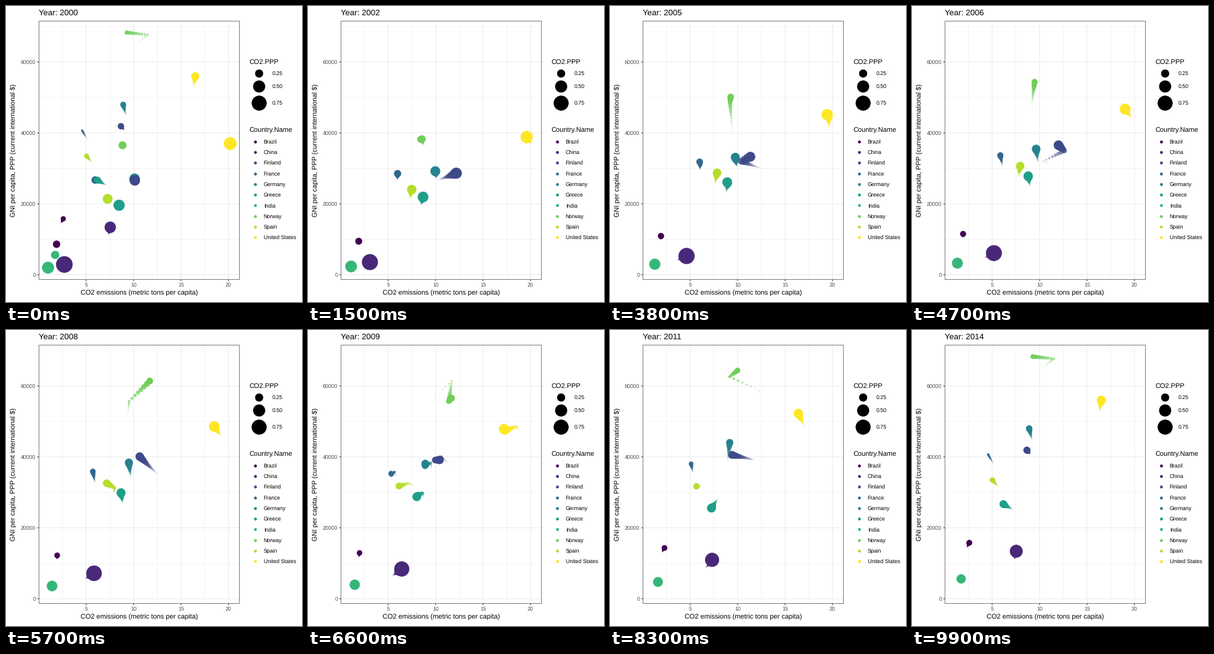
A matplotlib script for the animation above (10000 ms loop, 480 by 480 pixels).

```python
import numpy as np
import matplotlib as mpl
import matplotlib.pyplot as plt
from matplotlib.animation import FuncAnimation
from matplotlib.patches import Rectangle

SIZE, DPI = 480, 72          # one point equals one pixel
FRAMES, INTERVAL = 100, 100
FIRST_YEAR, SPAN = 2000, 14
WAKE = 15

mpl.rcParams["font.family"] = "Liberation Sans"
mpl.rcParams["text.hinting"] = "none"

years = np.arange(SPAN + 1)
tracks = {}


def country(name, *turns):
    """Yearly path through turning points (year, CO2 per head, income in $1000).

    Emissions run straight and income grows at a steady rate between turns.
    A turn in year 8 is followed by the recession of year 9 unless one is given.
    """
    turns = {t: (c, g) for t, c, g in turns}
    if 8 in turns:
        c, g = turns[8]
        turns.setdefault(9, (0.935 * c, 0.975 * g))
    t = sorted(turns)
    c, g = zip(*(turns[k] for k in t))
    tracks[name] = np.interp(years, t, c), np.exp(np.interp(years, t, np.log(g)))


country("Brazil", (0, 1.88, 8.6), (9, 1.95, 12.8), (14, 2.59, 15.8))
country("China", (0, 2.7, 2.9), (2, 3.01, 3.5), (11, 7.24, 10.3), (14, 7.54, 13.4))
country("United States", (0, 20.18, 37), (2, 19.6, 38.6), (5, 19.6, 44.6),
        (8, 18.5, 48.6), (12, 16.3, 52.8), (14, 16.5, 56))
country("Germany", (0, 10.1, 27.1), (5, 9.8, 32.3), (8, 9.5, 38.4),
        (12, 9.2, 44.8), (14, 8.9, 48))
country("India", (0, 0.98, 2), (14, 1.73, 5.6))
country("France", (0, 5.95, 26.7), (5, 6.05, 31.2), (8, 5.7, 35.9),
        (12, 5.07, 38.4), (14, 4.57, 40.7))
country("Spain", (0, 7.26, 21.4), (7, 8, 31.3), (8, 7.16, 32.6),
        (9, 6.2, 31.8), (12, 5.6, 31.7), (14, 5.03, 33.5))
country("Greece", (0, 8.47, 19.6), (5, 8.95, 25.5), (8, 8.67, 29.9),
        (12, 7.15, 25.2), (14, 6.18, 26.7))
country("Finland", (0, 10.13, 26.6), (3, 13, 29.5), (5, 10.4, 32), (6, 12.6, 35),
        (8, 10.64, 40.1), (10, 11.6, 39.3), (12, 9.03, 40.8), (14, 8.66, 41.9))
country("Norway", (0, 8.83, 36.5), (2, 8.4, 38.2), (3, 9.5, 38.7), (5, 9.2, 48.7),
        (7, 9.53, 55.7), (8, 11.7, 61.4), (9, 11.4, 55.7), (10, 12.3, 58.8),
        (11, 9.15, 62.6), (13, 11.5, 67.7), (14, 9.28, 68.3))

names = list(tracks)
co2, gni = np.array(list(tracks.values())).swapaxes(0, 1)
ratio = co2 / gni


def point_size(r):
    """Area scale running from size 1 to size 12."""
    lo, hi = ratio.min(), ratio.max()
    return 1 + 11 * np.sqrt((r - lo) / (hi - lo))


def marker_area(size):
    return (0.75 * (size * 2.845 + 0.945)) ** 2


def px(x):
    return 130 + 15.385 * (x - 5)


def py(y):
    return 435.8 - 5.75 * y


# Linear motion from year to year
keys = np.round(years * (FRAMES - 1) / SPAN)
steps = np.arange(FRAMES)


def tween(rows):
    return np.array([np.interp(steps, keys, row) for row in rows]).T


xs, ys, sizes = tween(px(co2)), tween(py(gni)), tween(point_size(ratio))

ordered = sorted(names)
palette = plt.get_cmap("viridis")(np.linspace(0, 1, len(names)))
colors = palette[[ordered.index(n) for n in names]]

fig = plt.figure(figsize=(SIZE / DPI, SIZE / DPI), dpi=DPI, facecolor="white")
ax = fig.add_axes([0, 0, 1, 1])
ax.set_xlim(0, SIZE)
ax.set_ylim(SIZE, 0)
ax.axis("off")

LEFT, RIGHT, TOP, BOTTOM = 53.5, 378.5, 24.5, 443.5
GRID, DARK, GREY = "#EBEBEB", "#333333", "#4D4D4D"


def line(x, y, color, width):
    ax.plot(x, y, color=color, lw=width, zorder=1, snap=False, solid_capstyle="butt")


def label(x, y, s, size=8.8, color="black", va="baseline", **kw):
    return ax.text(x, y, s, fontsize=size, color=color, va=va, **kw)


def dots(x, y, size, color):
    return ax.scatter(x, y, s=marker_area(size), c=color, edgecolors="face",
                      linewidths=0.71, zorder=3)


for v in np.arange(2.5, 20, 5):
    line([px(v)] * 2, [TOP, BOTTOM], GRID, 0.53)
for v in range(10, 80, 20):
    line([LEFT, RIGHT], [py(v)] * 2, GRID, 0.53)
for v in range(5, 25, 5):
    line([px(v)] * 2, [TOP, BOTTOM], GRID, 1.07)
    line([px(v)] * 2, [BOTTOM, BOTTOM + 2.75], DARK, 1.07)
    label(px(v), 455.4, str(v), color=GREY, ha="center")
for v in range(0, 80, 20):
    line([LEFT, RIGHT], [py(v)] * 2, GRID, 1.07)
    line([LEFT - 2.75, LEFT], [py(v)] * 2, DARK, 1.07)
    label(48.2, py(v) + 3.1, str(v * 1000), color=GREY, ha="right")
ax.add_patch(Rectangle((LEFT, TOP), RIGHT - LEFT, BOTTOM - TOP, fill=False,
                       ec=DARK, lw=0.65, zorder=5, snap=False))

title = label(53.2, 15, "", 13.2)
label(216, 468.6, "CO2 emissions (metric tons per capita)", 11, ha="center")
label(11.3, 234, "GNI per capita, PPP (current international $)", 11,
      rotation=90, ha="center", va="center")

label(394.6, 93.8, "CO2.PPP", 11)
for r, y in ((0.25, 109), (0.5, 129.8), (0.75, 157.2)):
    dots([410.2], [y], point_size(r), "black")
    label(431.2, y + 3.1, f"{r:.2f}")

label(394.6, 204, "Country.Name", 11)
for k, name in enumerate(ordered):
    y = 219.7 + 17.28 * k
    dots([403.5], [y], 1.5, [palette[k]])
    label(417.7, y + 3.1, name)

# Lag 0 is the current point, later lags form the fading wake
lags = np.arange(WAKE + 1)
fade = 1 - lags / (WAKE + 1)
rgba = np.tile(colors, (len(lags), 1))
rgba[:, 3] = np.repeat(fade, len(names))
shrink = (fade ** 2)[:, None]
cloud = dots(np.zeros(len(rgba)), np.zeros(len(rgba)), np.ones(len(rgba)), rgba)


def update(i):
    past = (i - lags) % FRAMES
    cloud.set_offsets(np.column_stack([xs[past].ravel(), ys[past].ravel()]))
    cloud.set_sizes(marker_area((sizes[past] * shrink).ravel()))
    title.set_text(f"Year: {FIRST_YEAR + SPAN * i // (FRAMES - 1)}")
    return cloud, title


anim = FuncAnimation(fig, update, frames=FRAMES, interval=INTERVAL,
                     repeat=True, repeat_delay=0)
plt.show()
```
